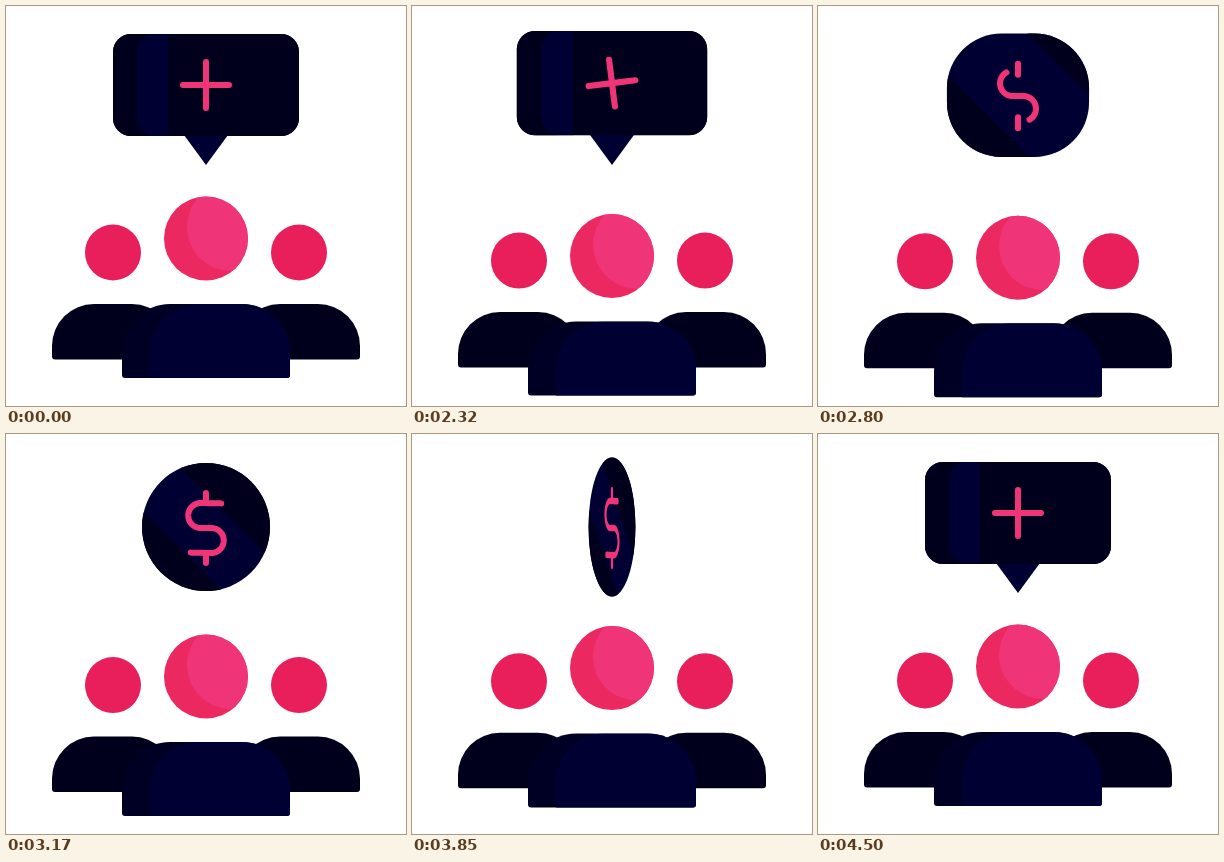
Write an HTML page with a canvas that moves like this. It is 400 px wide and 400 px high and loops after 4520 ms.

```html
<!DOCTYPE html>
<html lang="en">
<head>
<meta charset="utf-8">
<title>Team idea to money</title>
<style>
html, body { margin: 0; width: 100%; height: 100%; overflow: hidden; background: #fff; }
canvas { display: block; width: 400px; height: 400px; }
</style>
</head>
<body>
<canvas id="stage" width="400" height="400"></canvas>
<script>
const ctx = document.getElementById('stage').getContext('2d');
const LOOP = 4520, START = 2020;
const NAVY = '#000033', DARK = '#00001c', SHADE = '#000024';
const PINK = '#f03478', ROSE = '#eb2860', RED = '#e81f5a';

// Smooth monotone curve through [time, value] keys.
function track(...keys) {
  const slope = i => (keys[i + 1][1] - keys[i][1]) / (keys[i + 1][0] - keys[i][0]);
  const tangent = i => {
    if (i === 0 || i === keys.length - 1) return 0;
    const a = slope(i - 1), b = slope(i);
    return a * b <= 0 ? 0 : 2 * a * b / (a + b);
  };
  return t => {
    if (t <= keys[0][0]) return keys[0][1];
    const i = keys.findIndex(k => k[0] > t) - 1;
    if (i < 0) return keys[keys.length - 1][1];
    const [t0, v0] = keys[i], [t1, v1] = keys[i + 1];
    const d = t1 - t0, u = (t - t0) / d, w = 1 - u;
    return v0 * (1 + 2 * u) * w * w + tangent(i) * d * u * w * w
      + v1 * u * u * (3 - 2 * u) - tangent(i + 1) * d * u * u * w;
  };
}

const drop = track([2020, 0], [2320, 17.5], [2550, 20.3], [2800, 19.2], [3170, 10],
  [3650, 3], [3850, 1.6], [4200, 0.4], [4480, 0]);
const pop = track([2000, 1], [2020, 0.978], [2110, 0.93], [2320, 1.023], [2520, 1.075],
  [2800, 1.01], [3070, 1]);
const morph = track([2400, 0], [2600, 0.35], [2800, 0.78], [3070, 1]);
const twist = track([2000, 0], [2020, 2], [2110, 9], [2320, -7], [2650, -90]);
const bend = track([2420, 0], [2720, 1]);
const reach = track([2450, 23], [2800, 38], [3090, 65]);
const gap = track([2500, 0], [2800, 21], [3090, 25]);
const stem = track([2450, 23], [2800, 32], [3090, 35]);
const glint = track([2450, -270], [2800, -181], [3170, -140]);
const spin = track([3170, 0], [3850, 250], [4300, 360]);
const swell = track([3170, 1], [3450, 1.14], [3620, 1.117], [3850, 1.086], [4170, 1]);

const mix = (a, b, u) => a + (b - a) * u;

function fill(color) {
  ctx.fillStyle = color;
  ctx.fill();
}

function disc(x, y, r, color) {
  ctx.beginPath();
  ctx.arc(x, y, r, 0, 2 * Math.PI);
  fill(color);
}

function box(x, y, w, h, radii, color) {
  ctx.beginPath();
  ctx.roundRect(x, y, w, h, radii);
  fill(color);
}

function clipped(paint) {
  ctx.save();
  ctx.clip();
  paint();
  ctx.restore();
}

function sidePerson(x, y) {
  box(x - 61, 298 + y, 122, 55.5, [42, 42, 3, 3], DARK);
  disc(x, 246.5 + y, 28, RED);
}

function people(t) {
  const y = drop(t);
  sidePerson(107, y * 0.46);
  sidePerson(293, y * 0.46);

  box(116, 298 + y, 168, 74, [48, 48, 3, 3], SHADE);
  clipped(() => box(144, 298 + y, 168, 80, [48, 48, 0, 0], NAVY));
  disc(200, 232.5 + y, 42, ROSE);
  clipped(() => disc(225, 221 + y, 44, PINK));
}

// Fills one side of the diagonal y = x + c.
function wedge(c, side) {
  ctx.beginPath();
  ctx.moveTo(0, c);
  ctx.lineTo(400, 400 + c);
  ctx.lineTo(400, 400 + c + side * 600);
  ctx.lineTo(0, c + side * 600);
  fill(DARK);
}

function badge(t, m) {
  const half = mix(93, 64, m), top = mix(28, 29, m), bottom = mix(130, 157, m);
  const left = 200 - half, r = mix(18, 64, m);
  const tail = 29 * Math.max(0, 1 - 1.7 * m);
  if (tail > 0) {
    ctx.beginPath();
    ctx.moveTo(178, bottom - 1);
    ctx.lineTo(200, bottom + tail);
    ctx.lineTo(222, bottom - 1);
    fill(NAVY);
  }
  box(left, top, 2 * half, bottom - top, r, NAVY);
  clipped(() => {
    const strip = 24 * Math.max(0, 1 - 2 * m);
    if (strip > 0) {
      ctx.beginPath();
      ctx.rect(left - 5, top - 5, 60, bottom - top + 10);
      ctx.roundRect(left + strip, top, 2 * half, bottom - top, r);
      ctx.fillStyle = DARK;
      ctx.fill('evenodd');
    }
    if (m > 0) {
      wedge(mix(30, -60, Math.min(1, m / 0.75)), 1);
      wedge(glint(t), -1);
    }
  });
}

// Half of the crossbar, curling into half of an S as the bend grows.
function arm(length, curl) {
  let x = 0, y = 0, angle = 0;
  ctx.moveTo(0, 0);
  for (let s = 0; s < length; s += 0.5) {
    const step = Math.min(0.5, length - s);
    if (s >= 5.5 && s < 5.5 + 12.5 * Math.PI) angle += curl * step / 12.5;
    x += step * Math.cos(angle);
    y += step * Math.sin(angle);
    ctx.lineTo(x, y);
  }
}

function glyph(t, m) {
  ctx.save();
  ctx.translate(200, mix(79, 94, m));
  ctx.rotate(twist(t) * Math.PI / 180 + (t > 2650 ? Math.PI / 2 : 0));
  // The turn ends a quarter round, so the strokes swap roles on the way.
  if (t > START && t <= 2650) ctx.rotate(Math.PI / 2);
  ctx.strokeStyle = PINK;
  ctx.lineWidth = 6;
  ctx.lineCap = ctx.lineJoin = 'round';
  ctx.beginPath();
  for (let i = 0; i < 2; i++) {
    arm(reach(t), bend(t));
    ctx.moveTo(0, gap(t));
    ctx.lineTo(0, stem(t));
    ctx.rotate(Math.PI);
  }
  ctx.stroke();
  ctx.restore();
}

function draw(time) {
  const t = time < START ? 0 : time;
  const turn = spin(t);
  const look = turn > 270 ? 0 : t;
  const m = morph(look), s = pop(t), grow = swell(t);

  ctx.fillStyle = '#fff';
  ctx.fillRect(0, 0, 400, 400);
  people(t);

  ctx.save();
  ctx.translate(200, 159);
  ctx.scale(s, s);
  ctx.translate(0, -65.5);
  ctx.scale(grow * Math.max(0.01, Math.abs(Math.cos(turn * Math.PI / 180))), grow);
  ctx.translate(-200, -93.5);
  badge(look, m);
  glyph(look, m);
  ctx.restore();
}

const begin = performance.now();
function frame() {
  draw((performance.now() - begin) % LOOP);
  requestAnimationFrame(frame);
}
frame();
</script>
</body>
</html>
```
